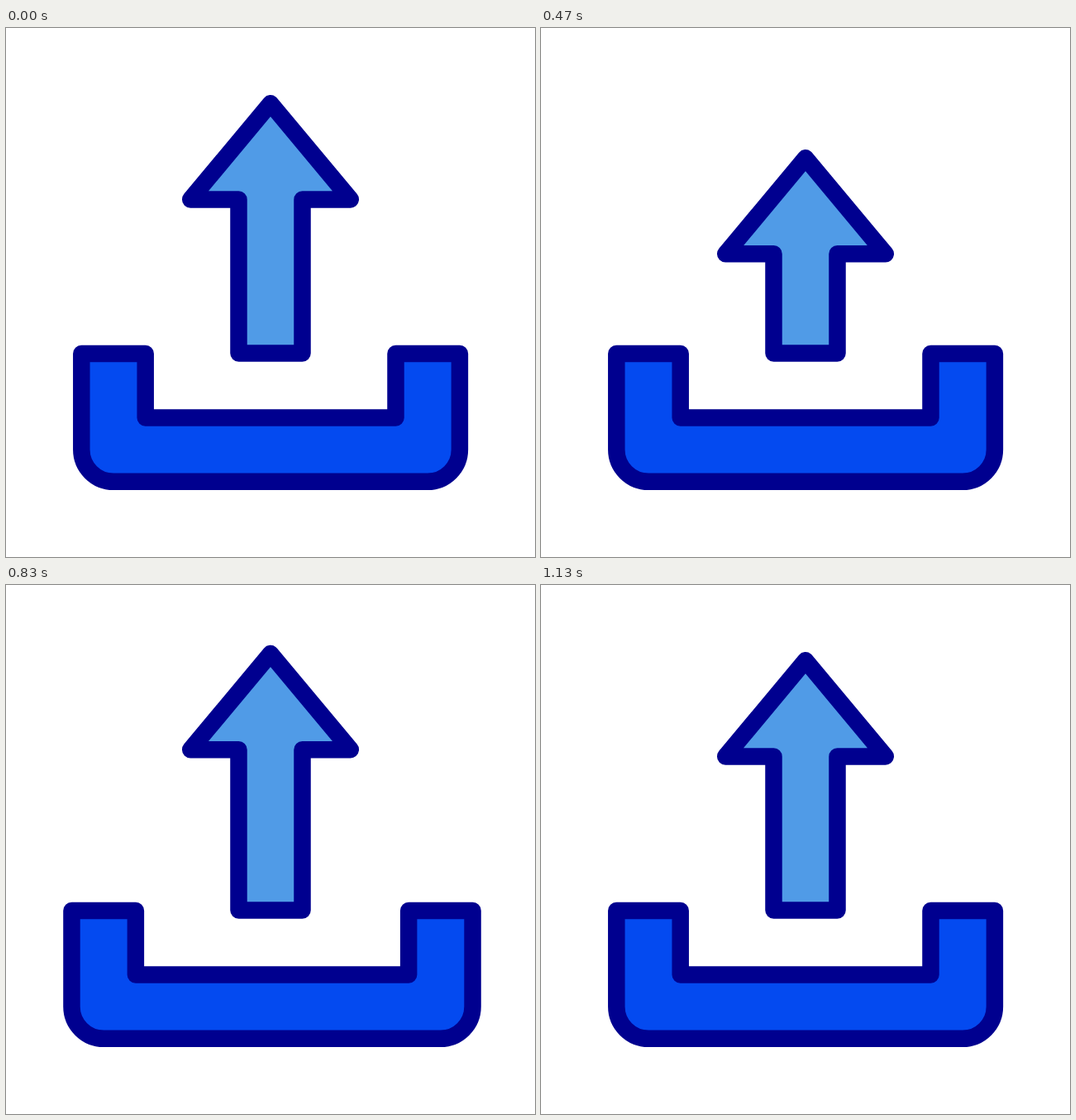
Write an HTML page that moves like this. It is 640 px wide and 640 px high and loops after 1.5 s.

```html
<!DOCTYPE html>
<html lang="en">
<head>
<meta charset="utf-8">
<title>Upload</title>
<style>
  html, body { margin: 0; height: 100%; overflow: hidden; background: #fff; }
  svg { display: block; width: 100%; height: 100%; }
  path { stroke: #00008f; stroke-width: 20.5; stroke-linejoin: round; }
</style>
</head>
<body>
<svg viewBox="0 0 640 640">
  <path id="arrow" fill="#509be7"/>
  <path id="tray" fill="#044af0"/>
</svg>
<script>
const LOOP = 1500, FPS = 30;
const arrow = document.getElementById('arrow');
const tray = document.getElementById('tray');

const smooth = t => t * t * (3 - 2 * t);
const easeOut = power => t => 1 - (1 - t) ** power;
const easeIn = power => t => t ** power;

// Keys are [frame, value, easing towards this key].
const headKeys = [
  [0, 0],
  [13, 72, easeOut(1.75)],
  [20.4, -49, smooth],
  [31, 22, easeOut(1.5)],
  [34, 0, easeIn(1.8)]
];
const stretchKeys = [[14, 0], [21, 1, smooth], [27.9, 0, smooth]];

function valueAt(keys, frame) {
  const next = keys.findIndex(key => key[0] > frame);
  if (next === 0) return keys[0][1];
  if (next < 0) return keys[keys.length - 1][1];
  const [start, from] = keys[next - 1];
  const [end, to, ease] = keys[next];
  return from + (to - from) * ease((frame - start) / (end - start));
}

function draw(frame) {
  const dy = valueAt(headKeys, frame);
  const wing = 207.4 + dy;
  arrow.setAttribute('d',
    `M320 ${91.3 + dy}L416.8 ${wing}H358.5V393.5H281.5V${wing}H223.2Z`);

  const stretch = valueAt(stretchKeys, frame);
  const left = 91.3 - 31 * stretch;
  const right = 548.9 + 41 * stretch;
  tray.setAttribute('d',
    `M${left} 393.9H${left + 77.4}V471.4H${right - 77.4}V393.9H${right}V510` +
    `a38.8 38.8 0 0 1 -38.8 38.8H${left + 38.8}a38.8 38.8 0 0 1 -38.8 -38.8Z`);
}

function tick() {
  // Frames start on whole hundredths of a second.
  const time = Math.floor(performance.now() % LOOP / 10) * 10;
  draw(Math.floor((time + 4) * FPS / 1000));
  requestAnimationFrame(tick);
}
tick();
</script>
</body>
</html>
```
